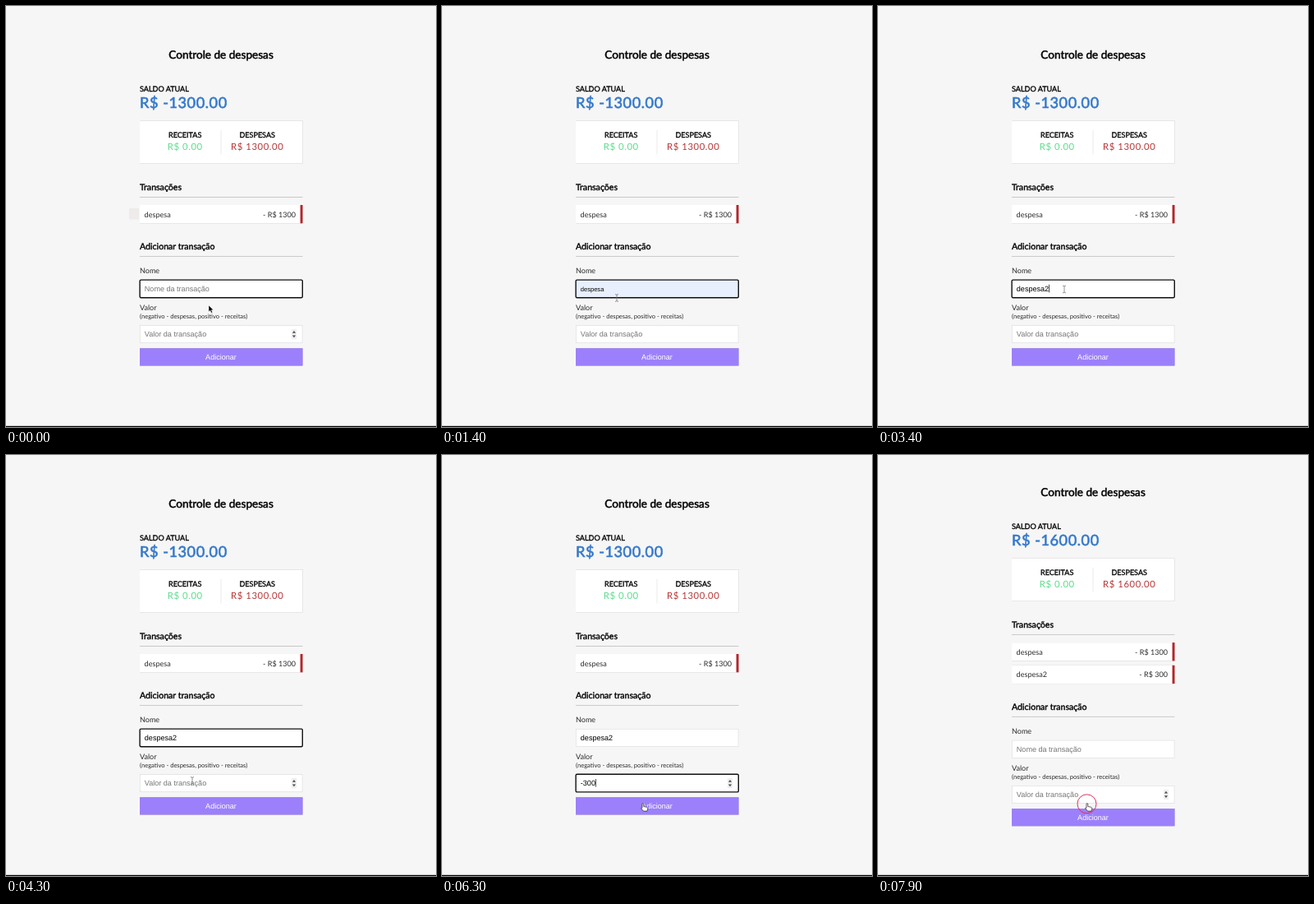
Write an HTML page that moves like this. It is 524x512 px and loops after 8000 ms.

```html
<!DOCTYPE html>
<html lang="pt-BR">
<head>
<meta charset="utf-8">
<title>Controle de despesas</title>
<style>
  html, body { margin: 0; width: 100%; height: 100%; overflow: hidden; background: #f6f6f6; }
  svg { display: block; width: 524px; height: 512px; }
  text { font: 9.07px Lato, sans-serif; fill: #2b2b2b; text-rendering: geometricPrecision; white-space: pre; }
  .bold { fill: #000; stroke: #000; stroke-width: .036em; }
  .title { font-size: 13.6px; }
  .section { font-size: 10.6px; }
  .balance { font-size: 18.13px; letter-spacing: .567px; fill: #3579cb; stroke: #3579cb; }
  .money { font-size: 11.33px; letter-spacing: .567px; }
  .hint { font-size: 7.55px; }
  .input { font-family: "Liberation Sans", Arial, sans-serif; }
  .mid { text-anchor: middle; }
  .end { text-anchor: end; }
  .card { fill: #fff; filter: drop-shadow(0 .6px .7px rgba(0,0,0,.32)); }
  .rule { fill: #bfbfbf; }
</style>
</head>
<body>
<svg viewBox="0 0 524 512">
  <rect width="524" height="512" fill="#f6f6f6"/>
  <g id="summary">
    <text class="bold title mid" x="262" y="64">Controle de despesas</text>
    <text class="bold" x="163" y="104.2">SALDO ATUAL</text>
    <text class="bold balance" id="balance" x="163" y="123.6"></text>
    <rect class="card" x="163" y="139.5" width="198.5" height="52"/>
    <rect x="261.7" y="151" width=".6" height="29.5" fill="#dedede"/>
    <text class="bold mid" x="218.2" y="159.6">RECEITAS</text>
    <text class="money mid" x="218.2" y="175.2" style="fill:#5bdc8a">R$ 0.00</text>
    <text class="bold mid" x="306.2" y="159.6">DESPESAS</text>
    <text class="money mid" id="spent" x="306.2" y="175.2" style="fill:#b83434"></text>
    <text class="bold section" x="163" y="224">Transações</text>
    <rect class="rule" x="163" y="232" width="198.5" height=".8"/>
    <rect id="ghost" x="150" y="246" width="12" height="13.5" fill="#efebeb"/>
    <g>
      <rect class="card" x="163" y="242" width="198.5" height="22.3"/>
      <rect x="358.6" y="242" width="2.9" height="22.3" fill="#b5262b"/>
      <text x="168.6" y="256.6">despesa</text>
      <text class="end" x="353" y="256.6">- R$ 1300</text>
    </g>
    <g id="added" transform="translate(0 27.7)">
      <rect class="card" x="163" y="242" width="198.5" height="22.3"/>
      <rect x="358.6" y="242" width="2.9" height="22.3" fill="#b5262b"/>
      <text x="168.6" y="256.6">despesa2</text>
      <text class="end" x="353" y="256.6">- R$ 300</text>
    </g>
  </g>
  <g id="form">
    <text class="bold section" x="163" y="296.4">Adicionar transação</text>
    <rect class="rule" x="163" y="304.1" width="198.5" height=".8"/>
    <text x="163" y="325.3">Nome</text>
    <rect id="nameBox"/>
    <text class="input" id="nameText" x="168.8" y="346.8"></text>
    <text x="163" y="369.9">Valor</text>
    <text class="hint" x="163" y="380.4">(negativo - despesas, positivo - receitas)</text>
    <rect id="valueBox"/>
    <text class="input" id="valueText" x="168.8" y="402.1"></text>
    <g id="spinner">
      <rect x="347.8" y="393" width="6.4" height="12.2" rx=".8" fill="#efefef"/>
      <path d="M348.9 397.8l2.1-2.8 2.1 2.8zM348.9 400.4l2.1 2.8 2.1-2.8z" fill="#4a4a4a"/>
    </g>
    <rect id="caret" width=".7" height="9.6" fill="#000"/>
    <rect class="card" x="163" y="416.2" width="198.5" height="21.3" style="fill:#9c80fb"/>
    <text class="input mid" x="262" y="429.8" style="fill:#fff">Adicionar</text>
  </g>
  <rect y="510.8" width="524" height="1.2" fill="#000"/>
  <circle id="ring" fill="none" stroke="#d8325f" stroke-width="1"/>
  <g id="pointer">
    <path id="arrow" d="M0 0v8l1.8-1.7 1.3 3 1.5-.7-1.3-2.9h2.5z" fill="#000" stroke="#fff" stroke-width=".5"/>
    <path id="beam" d="M-2-4.4Q0-4.4 0-3.2Q0-4.4 2-4.4M0-3.2V3.2M-2 4.4Q0 4.4 0 3.2Q0 4.4 2 4.4" fill="none" stroke="#777" stroke-width=".8"/>
    <path id="hand" d="M-1 .6Q0-.4.8.6V4l4 .8q1.2.4 1 1.8L5 9.6H.6L-2.4 6.2q.2-1.3 1.4-.4z" fill="#fff" stroke="#222" stroke-width=".7"/>
  </g>
</svg>
<script>
const LOOP = 8000, STEP = 100;
const FILL = 1000, COMMIT = 1600, EDIT = 3400, SWITCH = 4700, BLUR = 7400, SAVE = 7700;

// [time, x, y]
const path = [
  [0, 247, 364], [100, 247, 364], [700, 232, 348], [900, 228, 348], [1400, 213, 355],
  [1800, 213, 355], [2500, 224, 345], [3000, 224, 345], [3400, 227, 344.5], [3700, 227, 352],
  [4300, 227, 396], [5300, 227, 394], [6000, 227, 396], [6300, 245, 423.5],
  [6500, 245, 423.5], [6600, 249, 423.5], [7200, 255, 423.5], [8000, 255, 423.5]
];
const clicks = [[2600, 223.7, 345], [SWITCH, 227, 395], [SAVE, 254.5, 424.3]];
const nameSteps = [[0, ""], [400, "d"], [FILL, "despesa"], [EDIT, "despesa2"], [SAVE, ""]];
const valueSteps = [[0, ""], [5500, "-"], [5700, "-3"], [5900, "-30"], [6200, "-300"], [SAVE, ""]];
const caretResets = [400, COMMIT, EDIT, SWITCH, 5500, 5700, 5900, 6200];

const el = {};
document.querySelectorAll("[id]").forEach(node => el[node.id] = node);

const set = (node, attrs) => {
  for (const key in attrs) node.setAttribute(key, attrs[key]);
};
const show = (node, on) => { node.style.display = on ? "" : "none"; };
const latest = (steps, t) => steps.filter(s => s[0] <= t).pop()[1];

function pointerAt(t) {
  const i = Math.max(1, path.findIndex(p => p[0] > t));
  const [a, b] = [path[i - 1], path[i]];
  const k = (t - a[0]) / (b[0] - a[0]);
  return [a[1] + (b[1] - a[1]) * k, a[2] + (b[2] - a[2]) * k];
}

function drawField(box, text, top, value, placeholder, focused, fill) {
  const d = focused ? 0.2 : 0;
  set(box, {
    x: 163.3 - d, y: top - d, width: 197.8 + 2 * d, height: 21.2 + 2 * d,
    rx: focused ? 1.5 : 0, fill,
    stroke: focused ? "#101010" : "#dfdfdf", "stroke-width": focused ? 1.4 : 0.7
  });
  text.textContent = value || placeholder;
  text.style.fill = value ? "#000" : "#757575";
}

function render(t) {
  const saved = t >= SAVE;
  const preview = t >= FILL && t < COMMIT;
  const name = latest(nameSteps, t), value = latest(valueSteps, t);
  const nameFocus = t < SWITCH, valueFocus = t >= SWITCH && t < BLUR;

  set(el.summary, { transform: `translate(0 ${saved ? -13.9 : 0})` });
  set(el.form, { transform: `translate(0 ${saved ? 13.8 : 0})` });
  show(el.added, saved);
  show(el.ghost, t < 800);
  el.balance.textContent = saved ? "R$ -1600.00" : "R$ -1300.00";
  el.spent.textContent = saved ? "R$ 1600.00" : "R$ 1300.00";

  const autofilled = t >= FILL && t < EDIT;
  drawField(el.nameBox, el.nameText, 333.3, name, "Nome da transação", nameFocus, autofilled ? "#e8f0fe" : "#fff");
  drawField(el.valueBox, el.valueText, 388.5, value, "Valor da transação", valueFocus, "#fff");
  el.nameText.style.fontSize = preview ? "7.55px" : "";
  show(el.spinner, t < 400 || t >= 4000 && t < BLUR || saved);

  const reset = caretResets.filter(r => r <= t).pop();
  const blinkOn = reset !== undefined && (t - reset) % 1000 < 500;
  show(el.caret, blinkOn && !preview && t < BLUR);
  const field = nameFocus ? el.nameText : el.valueText;
  const typed = nameFocus ? name : value;
  set(el.caret, {
    x: 168.8 + (typed ? field.getComputedTextLength() : 0),
    y: nameFocus ? 338.8 : 394
  });

  const [x, y] = pointerAt(t);
  const shape = t < 500 ? "arrow" : t >= 6200 ? "hand" : "beam";
  set(el.pointer, { transform: `translate(${x} ${y})` });
  for (const kind of ["arrow", "beam", "hand"]) show(el[kind], kind === shape);

  const click = clicks.find(c => t >= c[0] && t < c[0] + 400);
  show(el.ring, click);
  if (click) set(el.ring, { cx: click[1], cy: click[2], r: 5.5 + (t - click[0]) * 0.03 });
}

const start = performance.now();
function tick() {
  const t = (performance.now() - start) % LOOP;
  render(Math.floor(t / STEP) * STEP);
  requestAnimationFrame(tick);
}
tick();
</script>
</body>
</html>
```
